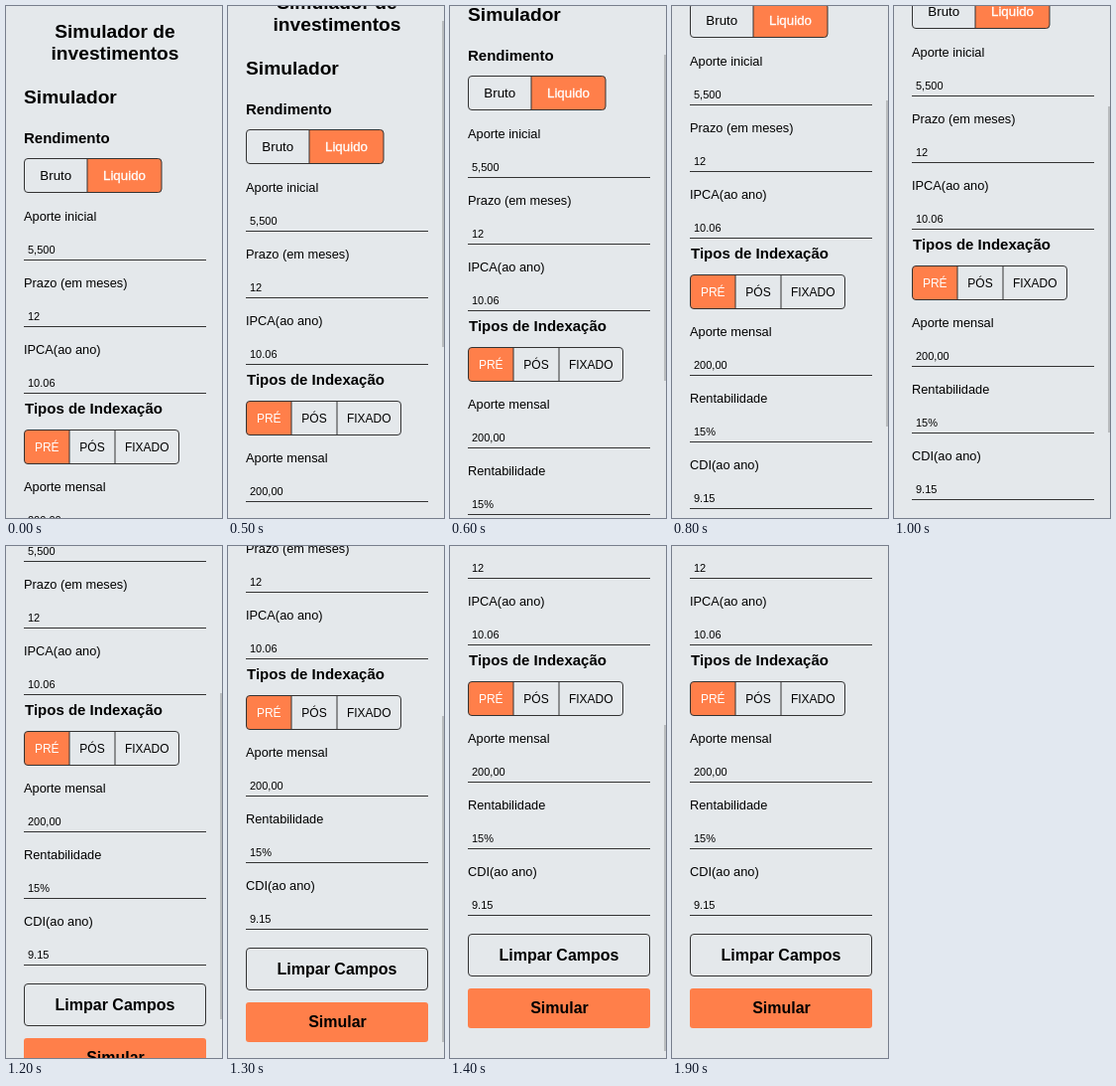
An HTML page for the animation above (2.5 s loop, 218 by 515 pixels).

```html
<!DOCTYPE html>
<html lang="pt-BR">
<head>
<meta charset="utf-8">
<title>Simulador de investimentos</title>
<style>
  html, body { margin: 0; width: 100%; height: 100%; overflow: hidden; background: #e4e8eb; }
  svg { display: block; }
  text { font-family: "Liberation Sans", Arial, sans-serif; fill: #000; }
  .title { font-size: 19.2px; font-weight: bold; }
  .head { font-size: 15px; font-weight: bold; }
  .label { font-size: 12.8px; }
  .value { font-size: 11px; }
  .toggle { font-size: 13.33px; }
  .small { font-size: 12px; }
  .action { font-size: 16px; font-weight: bold; }
  .on { fill: #fff; }
  .toggle.on { stroke: #fff; stroke-width: .3px; }
  .mid { text-anchor: middle; }
  .rule { fill: #333; }
  .box { fill: none; stroke: #333; }
  .hot { fill: #ff7f4a; }
</style>
</head>
<body>
<svg width="218" height="515" viewBox="0 0 218 515">
  <g id="page"></g>
  <rect id="thumb" x="216" y="0" width="2" height="328" fill="#b9bcbe"/>
</svg>
<script>
const page = document.getElementById('page');
const thumb = document.getElementById('thumb');

function add(tag, attrs, content = '') {
  const el = document.createElementNS('http://www.w3.org/2000/svg', tag);
  for (const key in attrs) el.setAttribute(key, attrs[key]);
  el.textContent = content;
  page.append(el);
}

const text = (x, y, cls, content) => add('text', { x, y, class: cls }, content);

function field(y, label, value) {
  text(18, y, 'label', label);
  text(22, y + 32.5, 'value', value);
  add('rect', { x: 18, y: y + 39, width: 184, height: 1, class: 'rule' });
}

// Joined buttons; edges holds the x of every border
function group(y, edges, names, active, cls, baseline) {
  const left = edges[0], right = edges[edges.length - 1];
  const a = edges[active], b = edges[active + 1], r = 3.5;
  const bottom = y + 34;
  add('path', {
    class: 'hot',
    d: a === left
      ? `M${b} ${y}H${a + r}Q${a} ${y} ${a} ${y + r}V${bottom - r}Q${a} ${bottom} ${a + r} ${bottom}H${b}Z`
      : `M${a} ${y}H${b - r}Q${b} ${y} ${b} ${y + r}V${bottom - r}Q${b} ${bottom} ${b - r} ${bottom}H${a}Z`
  });
  add('rect', { x: left, y, width: right - left, height: 34, rx: r, class: 'box' });
  edges.slice(1, -1).forEach(x => add('path', { d: `M${x} ${y}V${bottom}`, class: 'box' }));
  names.forEach((name, i) => text((edges[i] + edges[i + 1]) / 2, baseline,
    `${cls} mid${i === active ? ' on' : ''}`, name));
}

text(110, 32, 'title mid', 'Simulador de');
text(110, 54, 'title mid', 'investimentos');
text(18, 98, 'title', 'Simulador');
text(18, 138, 'head', 'Rendimento');
group(153.5, [18.5, 82, 157], ['Bruto', 'Liquido'], 1, 'toggle', 175);
field(216, 'Aporte inicial', '5,500');
field(283, 'Prazo (em meses)', '12');
field(350, 'IPCA(ao ano)', '10.06');
text(19, 410, 'head', 'Tipos de Indexação');
group(426.5, [18.5, 64, 110, 174.5], ['PRÉ', 'PÓS', 'FIXADO'], 0, 'small', 448);
field(488, 'Aporte mensal', '200,00');
field(555, 'Rentabilidade', '15%');
field(622, 'CDI(ao ano)', '9.15');
add('rect', { x: 18.5, y: 680.5, width: 183, height: 42, rx: 3.5, class: 'box' });
text(110, 707, 'action mid', 'Limpar Campos');
add('rect', { x: 18, y: 735, width: 184, height: 40, rx: 3, class: 'hot' });
text(110.5, 760, 'action mid', 'Simular');

// time in ms, scroll in px, scrollbar opacity
const loop = 2500;
const steps = [
  [0, 0, 0],
  [500, 29, 1], [600, 83, 1], [700, 130, 1],
  [800, 156, 1], [900, 164, 1], [1000, 165, 1],
  [1100, 194, 1], [1200, 240, 1], [1300, 276, 1], [1400, 290, 1],
  [1800, 290, .5], [1900, 290, 0], [loop, 290, 0]
];

function play(el, frame) {
  el.animate(steps.map(([time, scroll, opacity]) => ({
    offset: time / loop, easing: 'steps(1, end)', ...frame(scroll, opacity)
  })), { duration: loop, iterations: Infinity });
}

play(page, scroll => ({ transform: `translateY(${-scroll}px)` }));
play(thumb, (scroll, opacity) => ({
  transform: `translateY(${Math.max(0, Math.round(scroll * .632 - 3.3))}px)`, opacity
}));
</script>
</body>
</html>
```
